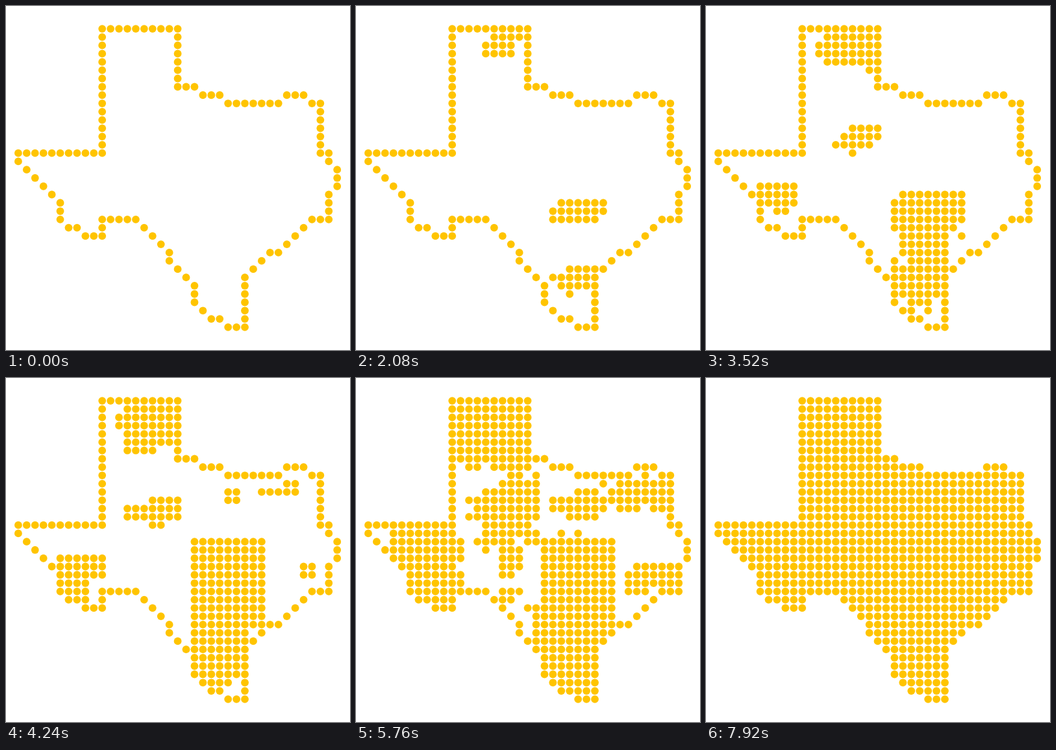
Write an HTML page with a canvas that moves like this. It is 530x530 px and loops after 8 s.

```html
<!DOCTYPE html>
<html lang="en">
<head>
<meta charset="utf-8">
<title>Texas dot map</title>
<style>
  html, body { margin: 0; height: 100%; overflow: hidden; background: #fff; }
  canvas { display: block; }
</style>
</head>
<body>
<canvas id="stage" width="530" height="530"></canvas>
<script>
const ctx = document.getElementById('stage').getContext('2d');
const LOOP = 8000, SAMPLE = 80, STEP = 120;
const COLS = 39, ROWS = 37;

// All paths are in grid units: one unit is one dot.
const border = new Path2D('M10 0H19V7h2l1 1h2l1 1h6l1-1h2l1 1h1v6h1v1l1 1v2l-1 1v3h-2l-4 4h-1l-3 3v6' +
  'h-2l-1-1h-1l-2-2v-2l-3-3v-1l-4-4h-4v2h-2l-1-1h-1l-1-1v-2l-5-5v-1H10z');

// Each phase fills its area between two steps, spreading from the dots already lit.
const phases = [
  { from: 1, to: 2, area: 'M26 22h.01' },
  { from: 4, to: 11, area: 'M16 0v2M25 21h1M22 22h4M24 29h1v1h-1z' },
  { from: 11, to: 23, area: 'M15 1h4M12 2h7v1h-7zM16 12h1v1h-1zM7 19h1M5 20h3' +
    'M23 21h5v2h-6v-1zM23 23h3v3h-3zM24 29h4M20 30h7v1h-6zM24 32h1' },
  { from: 23, to: 35, area: 'M13 1h6v4h-6zM13 6h3M16 12h3v2h-6v-1zM16 15h1M32 10h1v1h-4z' +
    'M25 11h1v1h-1zM5 19h5v2h-5zM5 22h3v2h-2l-1-1zM21 17h8v10h-8zM21 28h6v5h-6zM22 34h3M34 20h1v1h-1z' },
  { from: 35, to: 42, area: 'M11 1h8v6h-8zM17 10h2v6h-5v-4h3zM14 17h3M17 19v1M16 23h1v1h-1z' +
    'M32 10h4v2h-4zM29 11h7M22 12h14M22 13h6M4 16h6v6h-5v-2h-1zM5 23h9' +
    'M20 25h9v3h-9zM20 29h7M22 33h5v1h-5zM23 35h4M31 21h6v1h-6z' },
  { from: 42, to: 55, area: 'M12 8h8v10h-8zM3 16h9v2h-9zM11 15v7M16 19h3v2h-6v-1h3zM16 23h3v2h-3z' +
    'M16 25h4M9 24h1M33 9h3v5h-6v-4h3zM30 15h3M26 10h2v5h-5v-4h3zM23 16h3' +
    'M35 18h3v4h-6v-2h3zM31 23h6M32 24h2M32 25h1' },
  { from: 64, to: 66, area: 'M13 22h6' },
  { from: 55, to: 63, area: 'M0 0h38v36h-38z' }
];

ctx.lineWidth = 0.2;
ctx.lineCap = ctx.lineJoin = 'round';
const onLine = (path, d) => ctx.isPointInStroke(path, d.x, d.y);
const within = (path, d) => ctx.isPointInPath(path, d.x, d.y) || onLine(path, d);
const noise = d => Math.abs(Math.sin(d.x * 12.9898 + d.y * 78.233) * 43758.5453) % 1;

const dots = [];
for (let y = 0; y < ROWS; y++) {
  for (let x = 0; x < COLS; x++) {
    const d = { x, y };
    if (onLine(border, d)) d.step = 0;
    if (within(border, d)) dots.push(d);
  }
}

const lit = [];
for (const { from, to, area } of phases) {
  const path = new Path2D(area);
  const fresh = dots.filter(d => d.step === undefined && within(path, d));
  for (const d of fresh) {
    const near = Math.min(3, ...lit.map(o => Math.hypot(o.x - d.x, o.y - d.y)));
    d.order = near + noise(d) * 1.2;
  }
  fresh.sort((a, b) => a.order - b.order);
  fresh.forEach((d, i) => {
    d.step = from + Math.ceil((i + 1) / fresh.length * (to - from));
  });
  lit.push(...fresh);
}

function draw(now) {
  const t = Math.floor(now % LOOP / SAMPLE) * SAMPLE;
  const step = Math.floor(t / STEP);
  ctx.fillStyle = '#fff';
  ctx.fillRect(0, 0, 530, 530);
  ctx.fillStyle = '#ffc400';
  for (const d of dots) {
    if (d.step > step) continue;
    ctx.beginPath();
    ctx.arc(18.9 + d.x * 12.93, 35.1 + d.y * 12.77, 5.9, 0, Math.PI * 2);
    ctx.fill();
  }
}

const start = performance.now();
function tick() {
  draw(performance.now() - start);
  requestAnimationFrame(tick);
}
tick();
</script>
</body>
</html>
```
